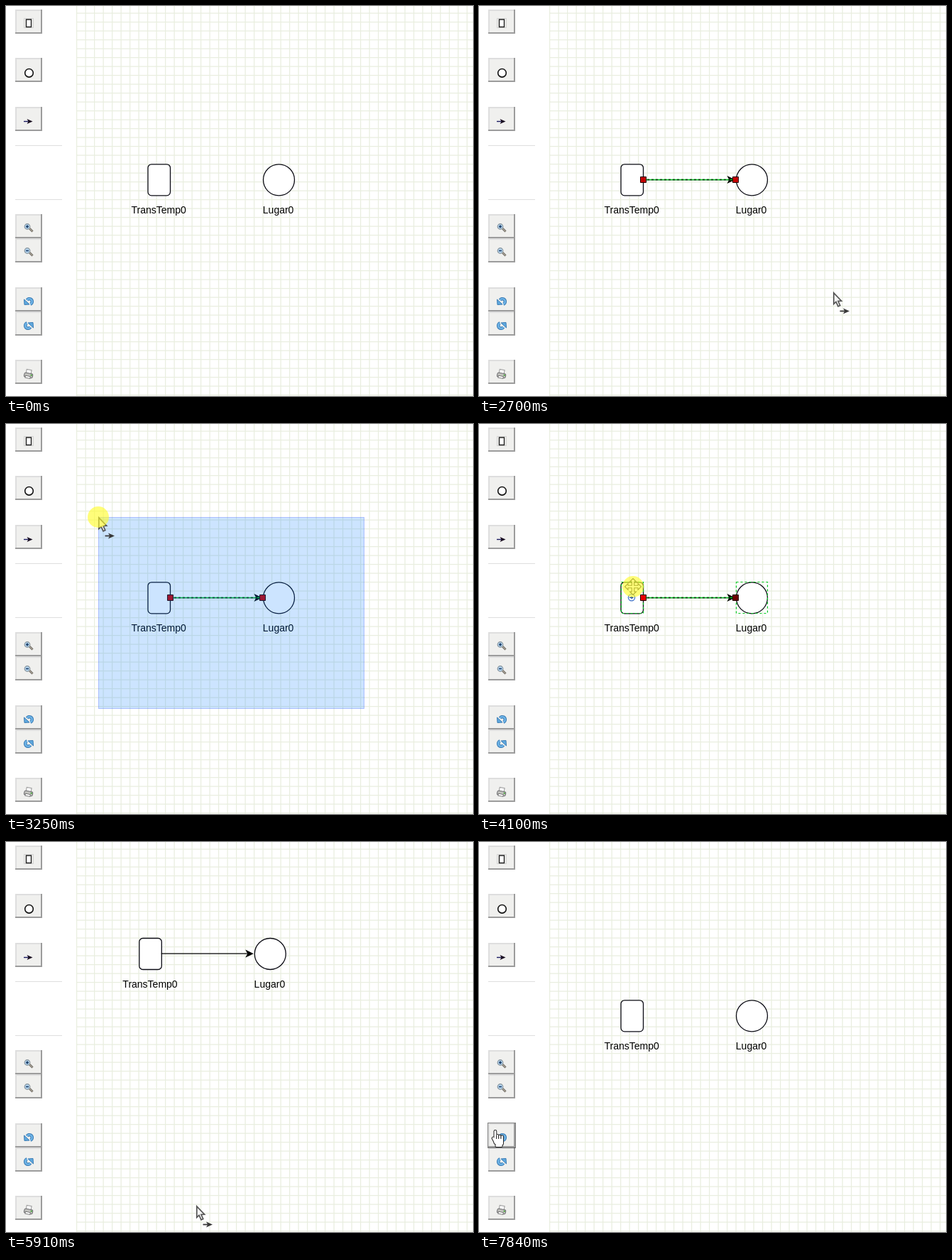
An HTML page with a canvas for the animation above (8000 ms loop, 658 by 549 pixels).

```html
<!DOCTYPE html>
<html lang="es">
<head>
<meta charset="utf-8">
<title>Editor de redes</title>
<style>
html, body { margin: 0; width: 100%; height: 100%; overflow: hidden; background: #fff; }
canvas { display: block; }
</style>
</head>
<body>
<canvas id="stage" width="658" height="549"></canvas>
<script>
const c = document.getElementById('stage').getContext('2d');
const LOOP = 8000, GRID = 12.5, GREEN = '#00c81e', INK = '#0b0b14';
const START = { x: 244, y: 406 }, ICON = { x: 215, y: 244.3 };
const GRAB = { x: 217, y: 229 }, BAND = { x: 505, y: 401 };

// Moments of the story
const LINK = 2550, SELECT = 3560, DROP = 5120, CLEAR = 5830, UNDO = 7210, UNLINK = 7760;
const PRESSES = [[1770, LINK], [2860, SELECT], [4100, DROP], [7060, UNDO], [7610, UNLINK]];
const DRAGS = [[1840, LINK], [2860, SELECT], [4170, DROP]];

// Pointer moves: begin, end, where to, sideways and downward bulge
const MOVES = [
  [240, 910, 208, 247, -62, 0],
  [1460, 1540, 213, 246],
  [1840, 2320, 387, 252, 0, 81],
  [2500, 2690, 499, 403],
  [2790, 2860, BAND.x, BAND.y],
  [2860, 3240, 130, 131],
  [3560, 3710, GRAB.x, GRAB.y],
  [4170, 4640, 210, 144, 6, 0],
  [4740, 4800, 210, 138],
  [5120, 5270, 212, 152],
  [5440, 5900, 268, 512],
  [5980, 6290, 65, 477, 0, 18],
  [6290, 6830, 23, 406]
];

const within = (t, spans) => spans.some(([a, b]) => t >= a && t < b);
const snap = v => Math.round(v / GRID) * GRID;

function pointer(t) {
  let { x, y } = START;
  for (const [a, b, tx, ty, bx = 0, by = 0] of MOVES) {
    if (t < a) break;
    const k = Math.min(1, (t - a) / (b - a)), bulge = 4 * k * (1 - k);
    x += (tx - x) * k + bx * bulge;
    y += (ty - y) * k + by * bulge;
  }
  return { x, y };
}

function paint(fill, stroke, width = 1) {
  if (fill) { c.fillStyle = fill; c.fill(); }
  if (stroke) { c.strokeStyle = stroke; c.lineWidth = width; c.stroke(); }
}

function box(x, y, w, h, fill, stroke, width, r = 0) {
  c.beginPath();
  c.roundRect(x, y, w, h, r);
  paint(fill, stroke, width);
}

function dot(x, y, r, fill, stroke, width) {
  c.beginPath();
  c.arc(x, y, r, 0, 7);
  paint(fill, stroke, width);
}

function poly(pts, fill, stroke, width) {
  c.beginPath();
  for (const [x, y] of pts) c.lineTo(x, y);
  c.closePath();
  paint(fill, stroke, width);
}

function line(x1, y1, x2, y2, stroke, width) {
  c.beginPath();
  c.moveTo(x1, y1);
  c.lineTo(x2, y2);
  paint(null, stroke, width);
}

// Notched arrowhead pointing right
function head(x, y, long, half, color) {
  poly([[x, y], [x - long, y - half], [x - long * .75, y], [x - long, y + half]], color);
}

function at(x, y, draw) {
  c.save();
  c.translate(x, y);
  draw();
  c.restore();
}

function dashed(draw, size = 3) {
  c.setLineDash([size, size]);
  draw();
  c.setLineDash([]);
}

// Toolbar icons, drawn around a point just below the button centre
function magnifier(plus) {
  line(1, 0, 5.5, 4.5, '#6f6c68', 3);
  line(1, 0, 5.5, 4.5, '#c9bfa8', 1);
  dot(-2, -2.5, 3.8, '#b5d6f0', '#8b979f', 1.2);
  line(-4, -2.5, 0, -2.5, '#1c3e68', 1.6);
  if (plus) line(-2, -4.5, -2, -.5, '#1c3e68', 1.6);
}

function curl(flip) {
  c.scale(flip, flip);
  for (const [color, width] of [['#3d7db5', 4.6], ['#6db3e6', 2.6]]) {
    c.beginPath();
    c.arc(1, 0, 3.8, -2.6, 1.2);
    paint(null, color, width);
  }
  poly([[-6.5, -3], [-6, 4.5], [1, 4]], '#5fa9df', '#3d7db5', 1);
}

function printer() {
  c.rotate(.2);
  box(-4, -6, 7, 7, '#fafafa', '#999');
  box(-6, -1, 12, 6, '#c4c4c0', '#6d6d70', 1, 2);
  box(-4, 3, 7, 3, '#fff', '#777');
  dot(4, 1, 1.2, '#55a848');
}

function transition() {
  dashed(() => box(-6.5, -7.5, 13, 13, null, '#bbb'), 1);
  box(-3.5, -6, 7, 10.5, '#fff', '#222', 1.4);
}

function arrow() {
  line(-7, .5, 0, .5, '#1c1c60', 1.4);
  head(5.5, .5, 8, 3.6, '#190d20');
}

const BUTTONS = {
  5: transition,
  73: () => dot(.5, 1.3, 5.8, '#fff', '#111', 1.6),
  142: arrow,
  293: () => magnifier(true),
  327: () => magnifier(false),
  396: () => curl(1),
  430: () => curl(-1),
  498: printer
};

function toolbar(focused) {
  for (const key in BUTTONS) {
    const y = +key;
    box(13, y, 38, 34, '#9c9c9c');
    box(13, y, 36, 32, '#dedede');
    box(15, y + 2, 34, 30, '#f0f0ee');
    at(32, y + 20, BUTTONS[key]);
  }
  for (const y of [196, 272]) box(13, y, 66, 1, '#dedede');
  if (focused) dashed(() => box(12.5, 395.5, 39, 35, null, '#000'), 1);
}

function grid() {
  c.fillStyle = '#e9eee0';
  for (let x = 99; x < 658; x += GRID) c.fillRect(x, 0, 1.25, 549);
  for (let y = -3; y < 549; y += GRID) c.fillRect(99, y, 559, 1.25);
}

function link(selected, many) {
  line(231, 244.5, 352, 244.5, '#000', 1.25);
  head(361, 244.5, 11.5, 5.6, '#000');
  if (!selected) return;
  line(231, 244.5, 361, 244.5, GREEN, 1.3);
  dashed(() => line(231, 244.5, 361, 244.5, '#04330a', 1.3));
  const colors = many ? ['#e80000', '#6c0000'] : ['#c40000', '#c40000'];
  colors.forEach((color, i) => box(227.5 + i * 130, 240.5, 8, 8, color, '#200'));
}

function cells(picked) {
  box(200, 222.8, 31.5, 44, '#fff', INK, 1.3, 5);
  dot(384.5, 244.8, 22, '#fff', INK, 1.3);
  c.fillStyle = '#000';
  c.font = '14px "Liberation Sans", Arial, sans-serif';
  c.textAlign = 'center';
  c.fillText('TransTemp0', 215.2, 292);
  c.fillText('Lugar0', 383.6, 292);
  if (picked) dashed(() => {
    box(200.5, 222.5, 31, 44, null, GREEN, 1.2);
    box(362.5, 222.5, 44, 44, null, GREEN, 1.2);
  });
}

function linkIcon() {
  dot(ICON.x, ICON.y, 4.6, '#fff', '#3b6fc9', 1.3);
  line(ICON.x - 3, ICON.y, ICON.x, ICON.y, '#1f4c9c', 1.3);
  head(ICON.x + 3, ICON.y, 4, 2.5, '#1f4c9c');
}

const CURSORS = {
  plain() {
    poly([[.8, .8], [.8, 16.5], [4, 13.5], [7, 19.8], [9.8, 18.5], [7, 12.5], [11.7, 12.2]],
      '#f4f4f4', '#555', 1.7);
  },
  arrow() {
    CURSORS.plain();
    line(9.5, 26.5, 17, 26.5, '#383838', 1.8);
    head(23, 26.5, 9, 4, '#383838');
  },
  // Outlines first, then the white fill, so the parts merge
  hand() {
    for (const [color, grow] of [['#222', 1], ['#fff', 0]]) {
      const part = (x, y, w, h, r) =>
        box(x - grow, y - grow, w + 2 * grow, h + 2 * grow, color, null, 0, r + grow);
      at(-4, 10, () => {
        c.rotate(-.5);
        part(-1, 0, 3, 10, 1.5);
      });
      for (let i = 0; i < 4; i++) part(-1.5 + i * 3.2, i ? 5.5 + i * .6 : 0, 2.8, 13, 1.4);
      part(-1.5, 11, 12.4, 8, 2);
      part(.5, 16, 9, 7, 1);
    }
    for (let i = 1; i < 4; i++) line(-1.7 + i * 3.2, 7, -1.7 + i * 3.2, 12, '#222');
  },
  move() {
    const pts = [];
    for (let i = 0; i < 4; i++) {
      const s = Math.round(Math.sin(i * Math.PI / 2)), k = Math.round(Math.cos(i * Math.PI / 2));
      for (const [x, y] of [[-1.7, -1.7], [-1.7, -7], [-4.5, -7], [0, -11.5], [4.5, -7], [1.7, -7]])
        pts.push([x * k - y * s, x * s + y * k]);
    }
    poly(pts, '#fff', '#444', 1.1);
  }
};

function dragLink(t, p) {
  const over = t >= 2260;
  const end = over ? { x: 361, y: 244.5 } : p;
  const dx = end.x - ICON.x, dy = end.y - ICON.y;
  const k = Math.min(1, 16 / (Math.hypot(dx, dy) || 1));
  dashed(() => line(ICON.x + dx * k, ICON.y + dy * k, end.x, end.y, GREEN, 1.2));
  if (over) dot(384.5, 244.8, 23, null, '#00e800', 3);
}

function rubberBand(p) {
  const w = BAND.x - p.x, h = BAND.y - p.y;
  box(p.x, p.y, w, h, 'rgba(0,119,255,.2)');
  if (w > 1) box(p.x + .5, p.y + .5, w - 1, h - 1, null, 'rgba(0,0,255,.17)');
}

function dragCells(p) {
  const dx = snap(p.x - GRAB.x), dy = snap(p.y - GRAB.y);
  if (dx || dy) dashed(() => box(200 + dx, 222.5 + dy, 207, 44.5, null, '#000'));
}

function cursorFor(p, over, local) {
  if (p.x < 45) return 'hand';
  if (p.x < 65) return 'plain';
  if (!over) return 'arrow';
  return Math.hypot(local.x - ICON.x, local.y - ICON.y) < 5 ? 'hand' : 'move';
}

function draw(t) {
  const p = pointer(t);
  const moved = t >= DROP && t < UNDO;
  const undone = t >= UNDO && t < UNLINK;
  const many = (t >= SELECT && t < CLEAR) || undone;
  const shift = moved ? { x: -12.2, y: -87.3 } : { x: 0, y: 0 };
  const local = { x: p.x - shift.x, y: p.y - shift.y };
  const [linking, banding, moving] = DRAGS.map(span => within(t, [span]));
  const over = Math.abs(local.x - 216) < 18 && Math.abs(local.y - 244) < 24
    && !linking && !banding && !moving;

  box(0, 0, 658, 549, '#fff');
  grid();
  toolbar(t >= 7060);

  at(shift.x, shift.y, () => {
    cells(many);
    if (t >= LINK && t < UNLINK) link(t < CLEAR || undone, many);
    if (over || moving) linkIcon();
  });

  if (linking) dragLink(t, p);
  if (banding) rubberBand(p);
  if (moving) dragCells(p);
  if (t >= 240) at(p.x, p.y, CURSORS[cursorFor(p, over, local)]);
  if (within(t, PRESSES)) dot(p.x, p.y, 15, 'rgba(255,252,40,.62)');
}

function tick() {
  draw(performance.now() % LOOP);
  requestAnimationFrame(tick);
}
tick();
</script>
</body>
</html>
```
